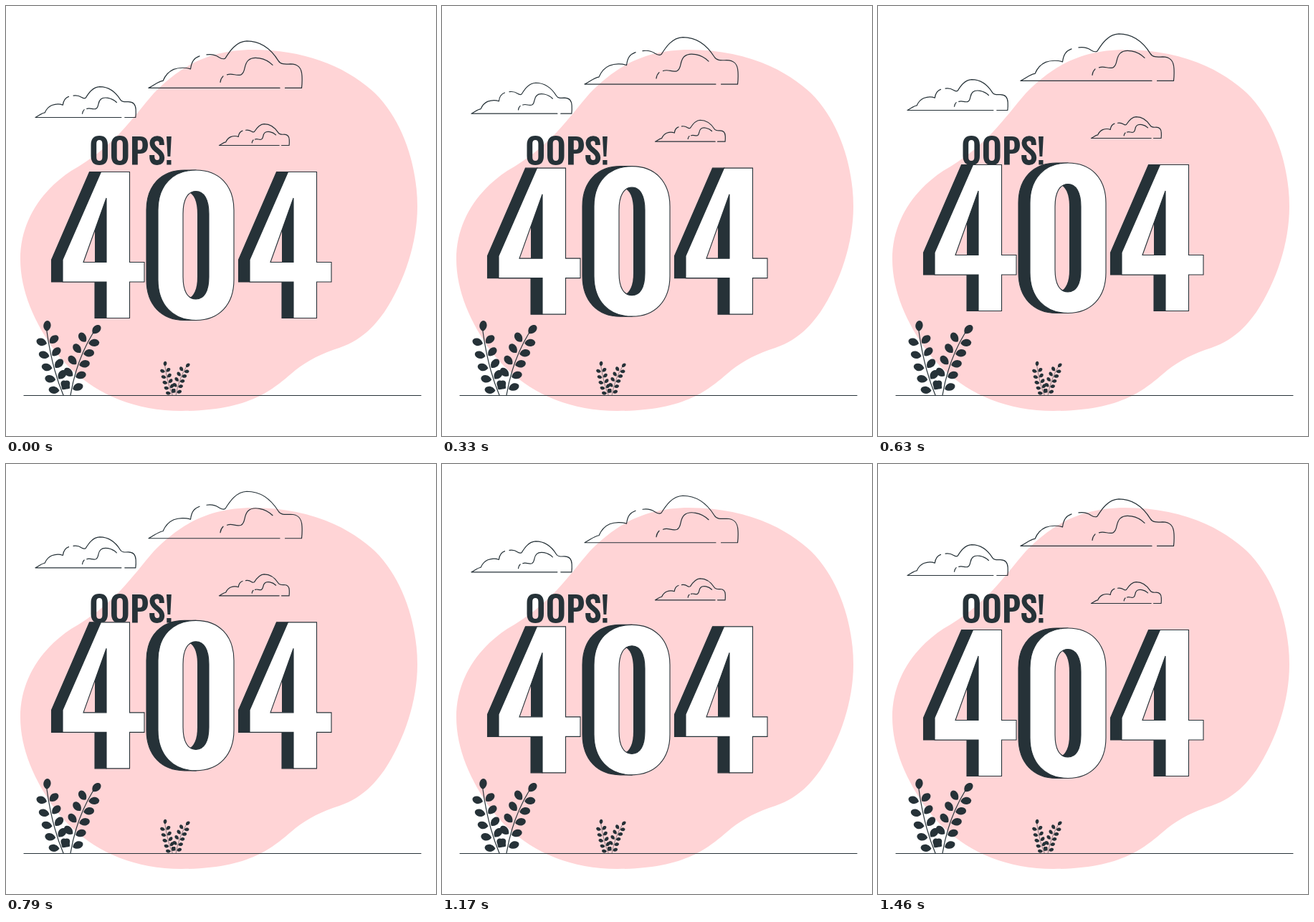
These frames come from a looping animation (600 by 600 pixels, 1.5 s). An HTML page:

```html
<!DOCTYPE html>
<html lang="en">
<head>
<meta charset="utf-8">
<title>404</title>
<style>
  html, body { margin: 0; width: 100%; height: 100%; overflow: hidden; background: #fff; }
  svg { display: block; width: 100%; height: 100%; }
  .line { fill: none; stroke: #263238; stroke-width: 1.2; stroke-linecap: round; stroke-linejoin: round; }
  .dark { fill: #263238; }
  .pink { fill: #ffd4d6; }
  .face { fill: #fff; fill-rule: evenodd; stroke: #263238; stroke-width: 1.1; }
  .side { fill: #263238; stroke: #263238; stroke-width: 1.1; }
</style>
</head>
<body>
<svg viewBox="0 0 600 600">
  <defs>
    <g id="cloud">
      <path d="M199 114H382M389.500 114H412.500Q413.500 106 413 97C412.500 86 408 80.500 397 80.500C388 81 383 81 380 76C370 60 356 48.500 336 48.500C321 49 312 63 306 72.500C303 74.500 300 73 297 71C292 67.500 287 66.500 280 67.500M270 69.500C263 72 259 76 257.500 87.500C251 85 241 85.500 234 88C227 91 222 97 219 104C212 105 207 110 199 114"/>
      <path d="M299 106Q299.500 101 303 97.500M308.500 95.500C316 92.500 321 98 328 95.500C335 92 331 82 338 75.500C345 69 362 72 372 82"/>
    </g>
    <path id="hole" d="M247 290C247 270 253.500 258.500 265 258.500S283 270 283 290V378C283 398 276.500 409 265 409S247 398 247 378Z"/>
    <clipPath id="holeClip"><use href="#hole"/></clipPath>
    <g id="four">
      <path class="side" d="M133 231.500H116.500L63.500 354V385H124V435.500H140L160 400V300Z"/>
      <path class="pink" d="M108 357.500H124V313Z"/>
      <path class="face" d="M132.500 231.500H172.500V357.500H193V385H172.500V435.500H140V385H79V354ZM140 268L108 357.500H140Z"/>
    </g>
    <g id="plant"></g>
  </defs>

  <path class="pink" d="M345 61C420 61 482 87 521 128C556 167 574 226 574 280C574 330 556 385 528 427C508 455 490 468 465 477C440 485 422 494 404 508C375 532 345 565 245 565C165 565 105 530 68 481C40 442 20 398 20 353C20 300 50 257 91 230C150 197 175 158 206 122C240 87 280 61 345 61Z"/>
  <path class="line" d="M25 543.500H579"/>
  <use href="#plant"/>
  <use href="#plant" transform="translate(195.600 293.700) scale(.46)"/>

  <g id="oops" class="dark" fill-rule="evenodd" role="img" aria-label="OOPS!">
    <path id="o" d="M118.500 194C118.500 185 122.500 181 130.300 181S142 185 142 194V209C142 218 138 222 130.300 222S118.500 218 118.500 209ZM126.200 192V211C126.200 214.500 127.500 216 130.300 216S134.400 214.500 134.400 211V192C134.400 188.500 133 187 130.300 187S126.200 188.500 126.200 192Z"/>
    <use href="#o" x="28.500"/>
    <path d="M176 182H187C194.500 182 198 186 198 194S194.500 206 187 206H183.800V221.500H176ZM183.800 187.500V200.500H186.500C189.500 200.500 190.500 198.500 190.500 194S189.500 187.500 186.500 187.500Z"/>
    <path fill="none" stroke="#263238" stroke-width="7" d="M217.300 194V192C217.300 187 215 184.800 211 184.800C206.500 184.800 204 187.500 204 191C204 197 208 199 211 201.500C215 204.500 217.700 207 217.700 211.500C217.700 216 215 218.500 211 218.500C206 218.500 203.700 215.500 203.700 210V208"/>
    <path d="M224 182H230.800L229.300 210H225.500ZM224.300 215H230.500V221.500H224.300Z"/>
  </g>

  <g id="float">
    <g class="line">
      <use href="#cloud" y=".4"/>
      <use href="#cloud" transform="translate(41 155.500) scale(.655) translate(-199 -114)" stroke-width="1.83" style="stroke-width: 1.83"/>
      <use href="#cloud" transform="translate(297.500 194.500) scale(.457) translate(-199 -114)" style="stroke-width: 2.63"/>
    </g>
    <use href="#four"/>
    <path class="side" d="M265 229H249C217 229 196 250 196 285V382C196 417 217 438.500 249 438.500H265L300 400V270Z"/>
    <g clip-path="url(#holeClip)"><use href="#hole" x="-16" class="pink"/></g>
    <path class="face" d="M212 285C212 250 233 229 265 229S318 250 318 285V382C318 417 297 438.500 265 438.500S212 417 212 382ZM247 290C247 270 253.500 258.500 265 258.500S283 270 283 290V378C283 398 276.500 409 265 409S247 398 247 378Z"/>
    <use href="#four" x="261"/>
  </g>
</svg>
<script>
  const NS = 'http://www.w3.org/2000/svg';
  const plant = document.getElementById('plant');
  const float = document.getElementById('float');

  function add(tag, attrs) {
    const el = document.createElementNS(NS, tag);
    for (const k in attrs) el.setAttribute(k, attrs[k]);
    plant.append(el);
  }

  // Pointed leaf growing from a stem point, angle in radians
  function leaf(x, y, angle, start) {
    const deg = angle * 180 / Math.PI;
    add('path', {
      class: 'dark',
      d: 'M0 0C2 -4 6 -6 10 -5C13.500 -4 15 -1.500 15 0C15 2.500 13 4.500 9.500 5C6 5.500 2 3.500 0 0Z',
      transform: `translate(${x} ${y}) rotate(${deg}) translate(${start} 0)`
    });
  }

  // Quadratic stem with five pairs of leaves and one at the tip
  function branch([x0, y0], [x1, y1], [x2, y2]) {
    add('path', { class: 'line', d: `M${x0} ${y0}Q${x1} ${y1} ${x2} ${y2}` });
    const mix = (a, b, c, t) => (1 - t) ** 2 * a + 2 * t * (1 - t) * b + t * t * c;
    const slope = (a, b, c, t) => (1 - t) * (b - a) + t * (c - b);
    for (let i = 0; i < 5; i++) {
      const t = 0.08 + i * 0.185;
      const x = mix(x0, x1, x2, t), y = mix(y0, y1, y2, t);
      const a = Math.atan2(slope(y0, y1, y2, t), slope(x0, x1, x2, t));
      leaf(x, y, a - 1.1, 3);
      leaf(x, y, a + 1.0, 2);
    }
    leaf(x2, y2, Math.atan2(y2 - y1, x2 - x1) + 0.2, 0);
  }

  branch([80, 543], [64, 505], [57, 454]);
  branch([90, 543], [98, 495], [121, 457]);

  // Linear rise and fall, drawn at 24 steps per second
  const LOOP = 1500, STEPS = 36, RISE = 12;
  const begin = performance.now();

  function draw(now) {
    const t = Math.max(0, now - begin) % LOOP;
    const p = (Math.floor((t + 5) * STEPS / LOOP) % STEPS + 0.5) / STEPS;
    const y = 0.33 - RISE * (1 - Math.abs(1 - 2 * p));
    float.setAttribute('transform', `translate(0 ${y.toFixed(3)})`);
    requestAnimationFrame(draw);
  }
  draw(begin);
</script>
</body>
</html>
```
